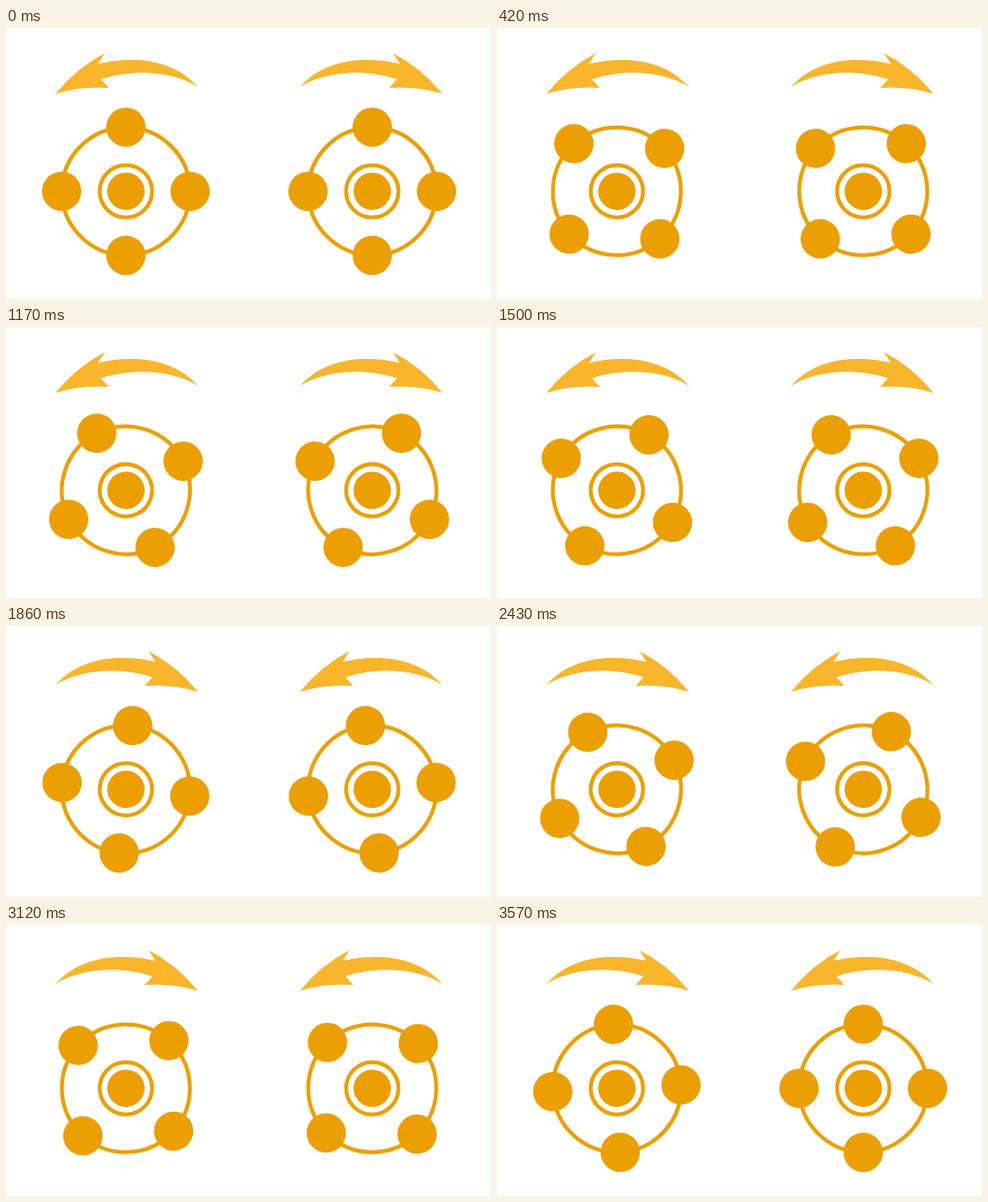
Recreate the animation shown at these times as an HTML page. Size 500 by 280 pixels, loop 3600 ms.

```html
<!DOCTYPE html>
<html lang="en">
<head>
<meta charset="utf-8">
<style>
  html, body { margin: 0; width: 100%; height: 100%; overflow: hidden; background: #fff; }
  svg { display: block; }
</style>
</head>
<body>
<svg width="500" height="280" viewBox="0 0 500 280">
  <defs>
    <path id="arrow" fill="#f9b52c" d="M51 68Q73 41 102 26L95 37C125 30 170 29 198 61C172 44 130 42 98 53L106 62Q78 60 51 68Z"/>
    <g id="gear" fill="#eb9f03">
      <g fill="none" stroke="#eb9f03" stroke-width="4">
        <circle r="66"/>
        <circle r="27"/>
      </g>
      <circle r="19.3"/>
      <circle cy="-66.2" r="20.3"/>
      <circle cx="66.2" r="20.3"/>
      <circle cy="66.2" r="20.3"/>
      <circle cx="-66.2" r="20.3"/>
    </g>
  </defs>
  <g id="outward">
    <use href="#arrow"/>
    <use href="#arrow" transform="translate(501) scale(-1 1)"/>
  </g>
  <g id="inward">
    <use href="#arrow" transform="translate(249) scale(-1 1)"/>
    <use href="#arrow" transform="translate(252)"/>
  </g>
  <use id="left" href="#gear"/>
  <use id="right" href="#gear"/>
</svg>
<script>
  const STEP = 30, STEPS = 120, HALF = STEPS / 2;
  const el = id => document.getElementById(id);
  const [outward, inward, left, right] = ['outward', 'inward', 'left', 'right'].map(el);

  const turn = (gear, x, angle) =>
    gear.setAttribute('transform', `translate(${x} 168.7) rotate(${angle})`);
  const show = (group, on) => group.setAttribute('visibility', on ? 'visible' : 'hidden');

  function draw(now) {
    const step = Math.floor(now / STEP) % STEPS;
    const back = step >= HALF;
    const n = step % HALF;
    show(outward, !back);
    show(inward, back);
    // Each half is a 180° turn; the right gear completes its return one step early.
    turn(left, 123.6, (back ? 1 : -1) * n * 180 / HALF);
    turn(right, 377.6, back ? -n * 180 / (HALF - 1) : n * 180 / HALF);
  }

  function loop() {
    draw(performance.now());
    requestAnimationFrame(loop);
  }
  loop();
</script>
</body>
</html>
```
